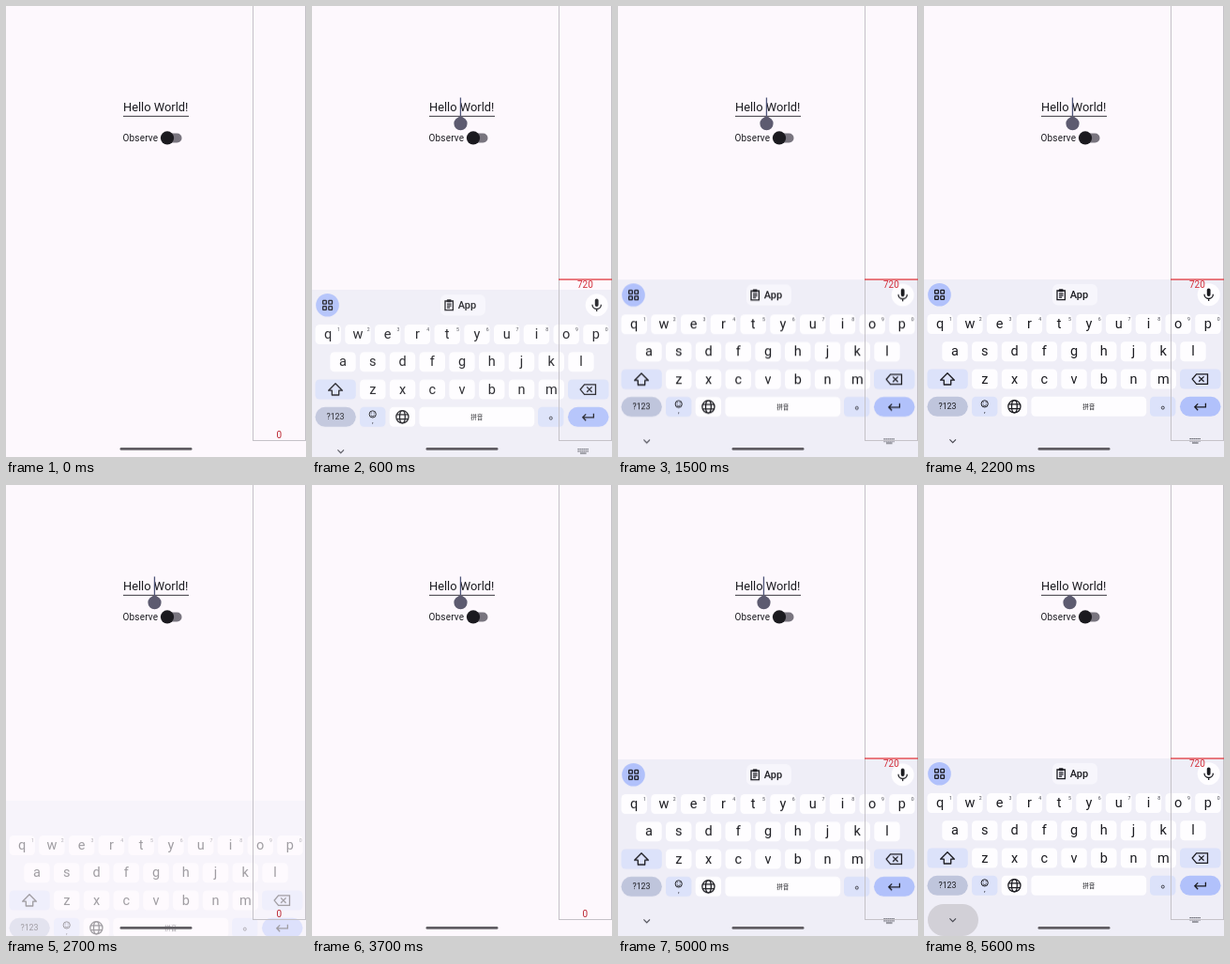
These frames come from a looping animation (320x480 px, 5.7 s). An HTML page:

```html
<!DOCTYPE html>
<html lang="en">
<head>
<meta charset="utf-8">
<title>Keyboard insets</title>
<style>
  html, body { margin: 0; width: 100%; height: 100%; overflow: hidden; background: #fdf8fd; }
  svg { display: block; width: 320px; height: 480px; font-family: Roboto, sans-serif; fill: #1b1b20; }
  .mid { text-anchor: middle; }
  .line { fill: none; stroke: #1b1b20; stroke-width: 1.3; }
  .letter { font-size: 14.5px; }
  .hint { font-size: 5.2px; fill: #45464f; }
  .red { font-size: 10px; fill: #d32f3a; }

  .anim { animation: 5.7s step-end infinite; }
  #keyboard { animation-name: slide, fade; animation-timing-function: linear; }
  #tools { animation-name: tools; }
  #caret { animation-name: caret; }
  #bar { animation-name: blink; }
  #press { animation-name: press; }
  #open { animation-name: open; }
  #closed { animation-name: closed; }

  @keyframes slide {
    0%, 7.01% { transform: translateY(57px); }
    7.015% { transform: translateY(16.5px); animation-timing-function: cubic-bezier(.23, .56, .56, 1); }
    29.47%, 40.35% { transform: none; animation-timing-function: cubic-bezier(.4, 0, .8, .8); }
    47.368% { transform: translateY(45px); }
    54.38%, 70.165% { transform: translateY(57px); }
    70.17% { transform: translateY(19px); animation-timing-function: cubic-bezier(.23, .56, .56, 1); }
    94.2%, 100% { transform: none; }
  }
  @keyframes fade {
    0%, 7.01% { opacity: 0; }
    7.015% { opacity: .72; }
    11.93%, 40.35% { opacity: 1; }
    47.368% { opacity: .42; }
    54.38%, 70.165% { opacity: 0; }
    70.17% { opacity: .63; }
    76.6%, 100% { opacity: 1; }
  }
  @keyframes tools {
    0% { opacity: 1; }
    43.85% { opacity: 0; }
    70.17%, 100% { opacity: 1; }
  }
  @keyframes caret {
    0% { opacity: 0; transform: none; }
    7.015% { opacity: 1; transform: none; }
    70.17%, 100% { opacity: 1; transform: translateX(-3px); }
  }
  @keyframes blink {
    0% { opacity: 1; }
    40.35% { opacity: 0; }
    45.61% { opacity: 1; }
    94.73%, 100% { opacity: 0; }
  }
  @keyframes press {
    0% { opacity: 0; }
    40.35% { opacity: 1; }
    43.85% { opacity: 0; }
    96.49%, 100% { opacity: 1; }
  }
  @keyframes open {
    0% { opacity: 0; }
    7.015% { opacity: 1; }
    42.1% { opacity: 0; }
    70.17%, 100% { opacity: 1; }
  }
  @keyframes closed {
    0% { opacity: 1; }
    7.015% { opacity: 0; }
    42.1% { opacity: 1; }
    70.17%, 100% { opacity: 0; }
  }
</style>
</head>
<body>
<svg viewBox="0 0 320 480">
  <rect width="320" height="480" fill="#fdf8fd"/>

  <text x="125" y="111.6" font-size="12.86">Hello World!</text>
  <rect x="125" y="116.8" width="70" height="1.1" fill="#49464e"/>
  <text x="124.5" y="144" font-size="10" letter-spacing=".18">Observe</text>
  <rect x="167" y="135.5" width="20.5" height="10" rx="5" fill="#79757f"/>
  <circle cx="172" cy="140.4" r="7.1" fill="#1b1a1f"/>

  <g id="caret" class="anim">
    <rect id="bar" class="anim" x="157.8" y="97.5" width="1.3" height="19.5" fill="#4d5478"/>
    <path d="M158.5 116.8L163.6 120.2A7.1 7.1 0 1 1 153.4 120.2Z" fill="#5d5b70"/>
  </g>

  <g id="keyboard" class="anim">
    <rect y="291" width="320" height="250" fill="#efeef7"/>
    <g id="tools" class="anim">
      <circle cx="16.5" cy="307.3" r="12.3" fill="#b1c1fb"/>
      <g class="line">
        <rect x="11.6" y="302.4" width="3.7" height="3.7" rx=".6"/>
        <rect x="17.8" y="302.4" width="3.7" height="3.7" rx=".6"/>
        <rect x="11.6" y="308.6" width="3.7" height="3.7" rx=".6"/>
        <rect x="17.8" y="308.6" width="3.7" height="3.7" rx=".6"/>
      </g>
      <rect x="137" y="296" width="48" height="22.5" rx="6" fill="#f7f6fc"/>
      <path class="line" d="M142 303H150.4V312.6H142ZM144 306.2H148.6M144 308.2H148.6M144 310.2H147.2"/>
      <rect x="143.8" y="301.2" width="4.8" height="3" rx=".8"/>
      <text x="155.8" y="311.2" font-size="11" font-weight="500">App</text>
      <circle cx="303.7" cy="307.3" r="12" fill="#fefdff"/>
      <rect x="301.8" y="300.5" width="3.8" height="8.4" rx="1.9"/>
      <path class="line" d="M299 306.8A4.7 4.7 0 0 0 308.4 306.8M303.7 311.4V314"/>
    </g>
    <g id="keys"></g>
    <path class="line" d="M25 390.8L32.4 398.2H28.7V403H21.3V398.2H17.6Z" stroke-linejoin="round"/>
    <path class="line" d="M290.6 391.8H302.5V402.4H290.6L286.2 397.1ZM293.2 394.4L298.6 399.8M298.6 394.4L293.2 399.8"/>
    <g class="line" stroke-width="1">
      <circle cx="64.7" cy="423.4" r="3.6" stroke-width="1"/>
      <path d="M62.8 424.4Q64.7 427 66.6 424.4M63.3 421.6V422.6M66.1 421.6V422.6" stroke-width=".9"/>
    </g>
    <text class="mid" x="64.8" y="432.6" font-size="8">,</text>
    <g class="line">
      <circle cx="96.4" cy="426.3" r="6.6"/>
      <ellipse cx="96.4" cy="426.3" rx="2.9" ry="6.6"/>
      <path d="M90.4 423.9H102.4M90.4 428.7H102.4"/>
    </g>
    <circle class="line" cx="254.8" cy="427.6" r="1.5" style="stroke-width:.8"/>
    <path class="line" d="M300.4 422.8V426.8H289M292.2 423.4L288.8 426.8L292.2 430.2"/>
    <rect id="press" class="anim" x="4" y="446" width="54" height="34" rx="17" fill="#d2d0d7"/>
    <path class="line" d="M27.4 461.4L30.7 464.7L34 461.4" style="stroke:#45464f;stroke-width:1.1"/>
    <path class="line" d="M283.5 460.6H295M283.5 462.8H295" stroke-dasharray="1.2 .8" style="stroke:#45464f"/>
    <path class="line" d="M286 465H292.6" style="stroke:#45464f;stroke-width:1"/>
  </g>

  <rect x="263.5" y="-2" width="56" height="464.5" fill="none" stroke="#c5c2c8"/>
  <g id="open" class="anim">
    <rect x="263" y="290.4" width="57" height="1.3" fill="#e0393f"/>
    <text class="red mid" x="291.4" y="300.4">720</text>
  </g>
  <text id="closed" class="red mid anim" x="291.4" y="460.2" style="fill:#b9202c">0</text>
  <rect x="121.5" y="470" width="77" height="2.8" rx="1.4" fill="#605d63"/>
</svg>
<script>
  const keys = document.getElementById('keys');
  const PITCH = 31.75, WHITE = '#fefdff', PALE = '#dce2fa';

  function add(tag, attrs, text = '') {
    const el = document.createElementNS('http://www.w3.org/2000/svg', tag);
    for (const name in attrs) el.setAttribute(name, attrs[name]);
    el.textContent = text;
    keys.append(el);
  }
  function key(x, y, width, fill = WHITE, rx = 4.5) {
    add('rect', { x, y: y - 10.5, width, height: 21, rx, fill });
  }
  function label(x, y, text, attrs) {
    add('text', { x, y, class: 'mid', ...attrs }, text);
  }
  function row(letters, x0, y, hints = '') {
    [...letters].forEach((ch, i) => {
      const x = x0 + i * PITCH;
      key(x - 13.7, y, 27.4);
      label(x, y + 4.6, ch, { class: 'mid letter' });
      if (hints) label(x + 11.3, y - 3.2, hints[i], { class: 'mid hint' });
    });
  }

  row('qwertyuiop', 17.2, 338.5, '1234567890');
  row('asdfghjkl', 33, 367.7);
  row('zxcvbnm', 64.8, 397);
  key(3.5, 397, 43.3, PALE);
  key(273, 397, 43.5, PALE);
  key(3.5, 426.3, 43.3, '#bfc5dc', 10.5);
  key(51, 426.3, 27.4, PALE);
  key(82.7, 426.3, 27.4);
  key(114.4, 426.3, 122.8);
  key(241, 426.3, 27.4, PALE);
  key(273, 426.3, 43.5, '#b1c1fb', 10.5);
  label(25, 429.4, '?123', { 'font-size': 8.8 });
  label(175.8, 428.8, '拼音', { 'font-size': 6.6, 'font-family': 'Noto Sans CJK SC, Noto Sans CJK, sans-serif' });
</script>
</body>
</html>
```
